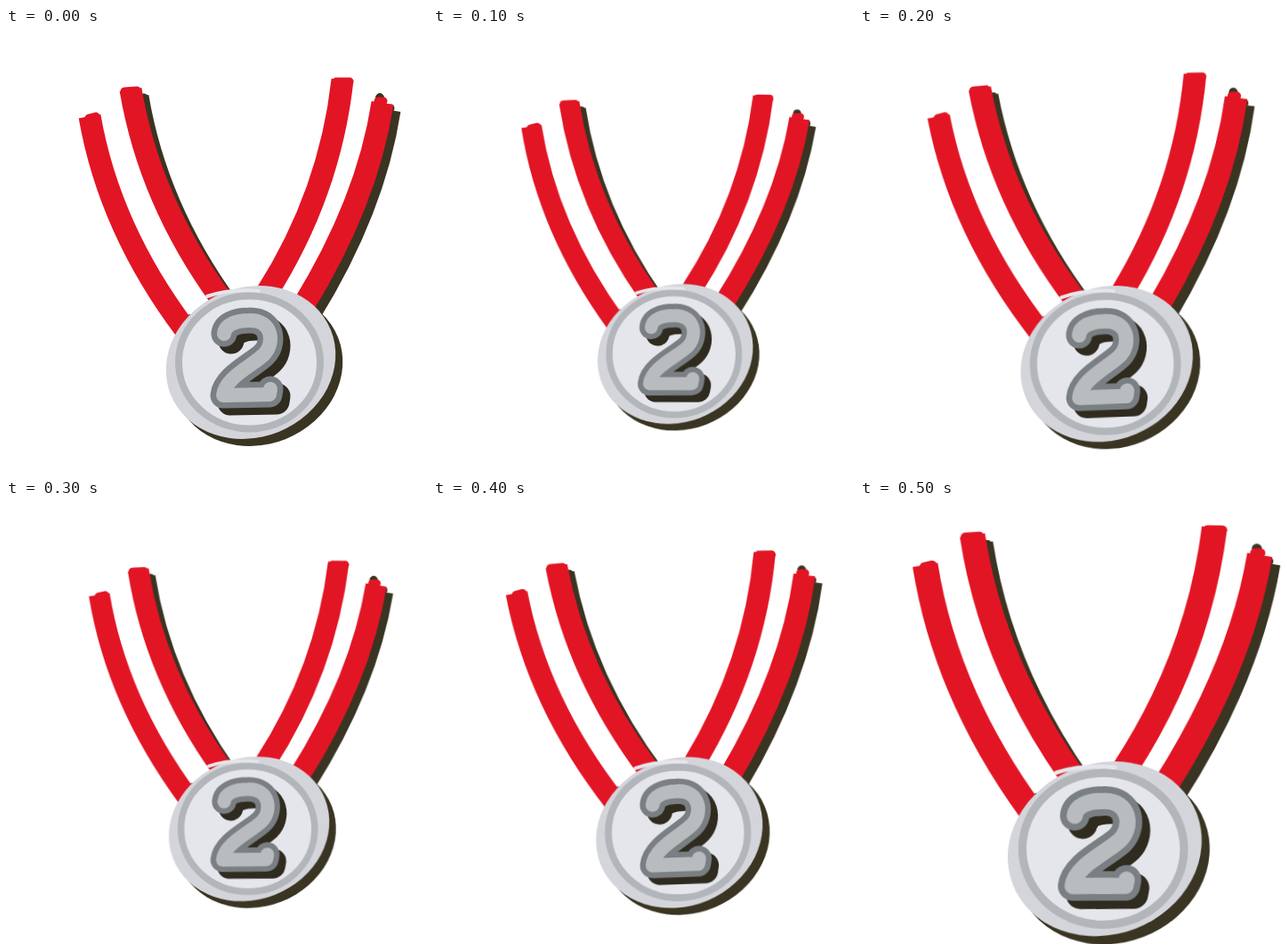
Write an HTML page that moves like this. It is 473 px wide and 498 px high and loops after 0.6 s.

```html
<!DOCTYPE html>
<html lang="en">
<head>
<meta charset="utf-8">
<title>Silver medal</title>
<style>
  html, body { margin: 0; width: 100%; height: 100%; overflow: hidden; background: #fff; }
  svg { display: block; width: 473px; height: 498px; }
  #medal { transform-origin: 261px 262px; transform-box: view-box; }
  .shade { fill: #3a3422; stroke: #3a3422; }
  .red { fill: none; stroke: #e21525; }
  .two { fill: none; stroke-linecap: round; stroke-linejoin: round; }
</style>
</head>
<body>
<svg viewBox="0 0 473 498">
  <defs>
    <g id="bands" fill="none">
      <path stroke-width="25" d="M94 99Q116 225 202 339M140 69Q161 193 241 303M378 58Q364 185 293 297M423 84Q406 195 333 313"/>
      <path stroke-width="9" stroke-linecap="round" d="M93 101L101 99M133 71L147 70M371 60L386 60M418 82L424 82"/>
    </g>
    <ellipse id="disc" rx="97" ry="84" transform="translate(275 375) rotate(-22)"/>
    <path id="digit" d="M245 343C246 333 258 328 273 328C300 327 302 354 290 366C278 378 246 392 244 412L296 411L297 405"/>
  </defs>
  <g id="medal">
    <g class="shade" transform="translate(8 8)">
      <use href="#bands"/>
      <use href="#disc" stroke="none" style="stroke: none"/>
    </g>
    <path fill="none" stroke="#fff" stroke-width="30" d="M117 84Q139 209 216 314M401 60Q385 195 317 299"/>
    <circle class="shade" cx="420" cy="78" r="4.5"/>
    <use class="red" href="#bands"/>

    <use href="#disc" fill="#d4d5da"/>
    <path d="M226 301Q252 292 284 295" fill="none" stroke="#e5e6ea" stroke-width="4" stroke-linecap="round"/>
    <ellipse cx="273.5" cy="375" rx="79.5" ry="74.5" fill="#e5e6eb" stroke="#b2b5ba" stroke-width="8"/>

    <g class="two">
      <use href="#digit" x="8" y="8" stroke="#302b1f" stroke-width="29"/>
      <use href="#digit" stroke="#797f82" stroke-width="29"/>
      <use href="#digit" stroke="#b9bcbf" stroke-width="16"/>
    </g>
  </g>
</svg>
<script>
  const STEP = 100;
  // Scale and tilt in degrees around one pivot, held for a step each
  const poses = [[1, 0], [0.915, 0.9], [1.017, -1], [0.945, 0.6], [0.984, -1], [1.142, 0.9]];
  const medal = document.getElementById("medal");

  const frames = [...poses, poses[0]].map(([scale, tilt], i) => ({
    offset: i / poses.length,
    easing: "step-end",
    transform: `rotate(${tilt}deg) scale(${scale})`
  }));
  medal.animate(frames, { duration: STEP * poses.length, iterations: Infinity });
</script>
</body>
</html>
```
